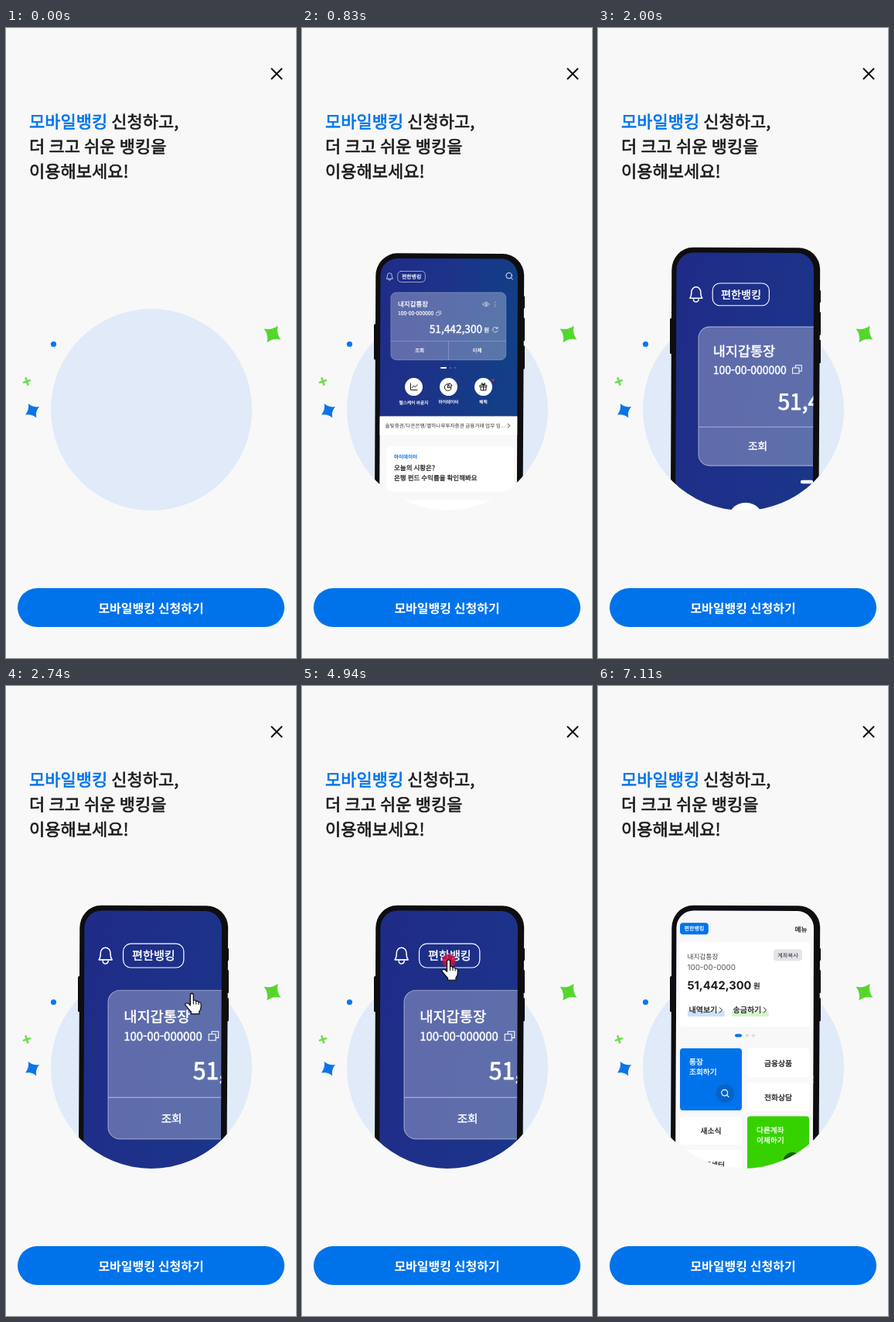
Write an HTML page that moves like this. It is 375 by 812 pixels and loops after 8200 ms.

```html
<!DOCTYPE html>
<html lang="ko">
<head>
<meta charset="utf-8">
<title>모바일뱅킹 신청</title>
<style>
html, body { margin: 0; width: 100%; height: 100%; overflow: hidden; background: #f8f8f8; }
svg { display: block; width: 375px; height: 812px; }
text {
  font-family: "Noto Sans CJK KR", "Noto Sans CJK", sans-serif;
  text-rendering: geometricPrecision;
  word-spacing: -.045em;
  white-space: pre;
  fill: currentColor;
}
tspan { fill: currentColor; }
/* medium weight: regular outlines, slightly thickened */
.medium, .medium tspan { font-weight: 400; stroke: currentColor; stroke-width: .03em; stroke-linejoin: round; }
text.num { font-family: Inter, "Noto Sans", sans-serif; }
.line { fill: none; stroke: #fff; stroke-linecap: round; stroke-linejoin: round; }
.ink { stroke: #1a1a1a; }
</style>
</head>
<body>
<svg viewBox="0 0 375 812" xmlns="http://www.w3.org/2000/svg">
  <defs>
    <linearGradient id="navy" x1="0" x2="1" y1="0" y2=".25">
      <stop offset="0" stop-color="#202b87"/>
      <stop offset=".5" stop-color="#1c3389"/>
      <stop offset="1" stop-color="#123f86"/>
    </linearGradient>
    <mask id="stand" maskUnits="userSpaceOnUse" x="0" y="0" width="375" height="812">
      <path d="M0 0H375V492H318A130 130 0 0 1 58 492H0Z" fill="#fff"/>
    </mask>
    <clipPath id="glass"><path d="M100 640L101.5 312A22 22 0 0 1 124 289.5L258 290A21 22 0 0 1 279 312L277.7 640Z"/></clipPath>
    <clipPath id="hole"><circle id="reveal" cx="192.5" cy="364" r="0"/></clipPath>
    <path id="star" d="M0-13Q3.4-3.4 13 0Q3.4 3.4 0 13Q-3.4 3.4-13 0Q-3.4-3.4 0-13Z"/>
  </defs>

  <rect width="375" height="812" fill="#f8f8f8"/>
  <path d="M343.5 52.5L356.5 65.5M356.5 52.5L343.5 65.5" stroke="#111" stroke-width="2" stroke-linecap="round"/>
  <circle cx="188" cy="492" r="130" fill="#e0eaf9"/>
  <use href="#star" transform="translate(344.5 394.7) rotate(33)" fill="#55d62f"/>
  <use href="#star" transform="translate(34 493.3) rotate(-30) scale(.8)" fill="#0b74e8"/>
  <path d="M-5.3 0H5.3M0-5.3V5.3" transform="translate(27 455.5) rotate(-18)" stroke="#6bdb4a" stroke-width="2.6"/>
  <circle cx="61.5" cy="407.5" r="3.6" fill="#0b78ee"/>
  <g id="head"></g>
  <rect x="15" y="722" width="345" height="50" rx="25" fill="#0073eb"/>
  <g id="cta"></g>

  <g mask="url(#stand)">
    <g id="phone">
      <g fill="#0e0e10">
        <rect x="93" y="374" width="4" height="46" rx="1.5"/>
        <rect x="284" y="338" width="4" height="16" rx="1"/>
        <rect x="284" y="366" width="4" height="30" rx="1"/>
        <rect x="284" y="402" width="4" height="30" rx="1"/>
        <path d="M93.800 640L95.300 312A28 29 0 0 1 123 282.700L259 283.300A28 28 0 0 1 287.200 311L285.300 640Z"/>
      </g>
      <g clip-path="url(#glass)">
        <g id="home">
          <rect x="95" y="284" width="190" height="209.500" fill="url(#navy)"/>
          <rect x="95" y="493" width="190" height="320" fill="#f8f8f8"/>
          <rect x="95" y="493" width="190" height="24" fill="#fff"/>
          <g class="line" stroke-width=".7">
            <path d="M109.400 315.300Q110.400 314 110.400 311.400A2.900 3.200 0 0 1 116.200 311.400Q116.200 314 117.200 315.300ZM111.700 316A1.600 1.600 0 0 0 114.900 316"/>
            <rect x="123.700" y="305.900" width="35.600" height="14" rx="4.500" stroke-width=".55"/>
            <circle cx="267.600" cy="311.600" r="3.700" stroke-width=".9"/>
            <path d="M270.300 314.300L272.500 316.500" stroke-width=".9"/>
          </g>
          <rect x="114.800" y="333.200" width="149" height="87.100" rx="7" fill="#fff" fill-opacity=".29" stroke="#fff" stroke-opacity=".45" stroke-width=".5"/>
          <path d="M115 396H263.600M189.500 396V420.200" stroke="#fff" stroke-opacity=".45" stroke-width=".5"/>
          <g class="line" stroke-width=".6">
            <path d="M175.800 358.800V357.300H179.700V361H178.200M174 358.900H178.100V362.500H174Z" stroke-width=".5"/>
            <path d="M233.800 348.500Q238 343 242.200 348.500Q238 354 233.800 348.500Z"/>
            <circle cx="238" cy="348.500" r="1.300"/>
            <path d="M249.500 345.700V345.800M249.500 348.500V348.600M249.500 351.300V351.400" stroke-width=".9"/>
            <path d="M252.600 379.200A3.300 3.300 0 1 0 253 382.500M253 377.800V379.800H251" stroke-width=".7"/>
          </g>
          <rect x="179" y="429.300" width="8" height="2.200" rx="1.100" fill="#fff"/>
          <circle cx="192" cy="430.400" r=".8" fill="#fff" opacity=".5"/>
          <circle cx="197.800" cy="430.400" r=".8" fill="#fff" opacity=".5"/>
          <g fill="#fff">
            <circle cx="144.500" cy="455" r="11.500"/>
            <circle cx="189.500" cy="455" r="11.500"/>
            <circle cx="234.500" cy="455" r="11.500"/>
          </g>
          <g class="line ink" stroke-width="1">
            <path d="M140.500 450.500V459H149M142.300 456L144.600 453.500L146.300 455L149 452.200"/>
            <path d="M188.500 451.200A4.300 4.300 0 1 0 193 456H188.500ZM190.300 450.300A4.300 4.300 0 0 1 194 454.300H190.300Z"/>
            <path d="M230.300 452.800H238.700V455H230.300ZM231 455V459.300H238V455M234.500 452.800V459.300M234.500 452.600Q231 451.500 232.300 450.200Q233.800 449.700 234.500 452.600Q235.200 449.700 236.700 450.200Q238 451.500 234.500 452.600"/>
          </g>
          <circle cx="247" cy="446" r="1.700" fill="#e3223f"/>
          <path class="line ink" stroke-width=".9" d="M266.300 502.500L268.800 505L266.300 507.500"/>
          <rect x="109" y="532" width="165" height="58" rx="6" fill="#fff"/>
          <rect x="101" y="601" width="178" height="80" rx="6" fill="#fff"/>
          <g id="homeText"></g>
        </g>
        <g clip-path="url(#hole)">
          <rect x="95" y="284" width="190" height="360" fill="#f8f8f8"/>
          <rect x="106" y="305.300" width="36.800" height="14.900" rx="4" fill="#0073eb"/>
          <g id="tiles"></g>
          <rect x="227" y="339.300" width="37" height="15" rx="4" fill="#e3e4e7"/>
          <g fill="#dcdcdc">
            <rect x="177" y="448.500" width="9" height="4" rx="2" fill="#0073eb"/>
            <circle cx="192.800" cy="450.500" r="1.900"/>
            <circle cx="201" cy="450.500" r="1.900"/>
          </g>
          <rect x="116" y="419" width="47.500" height="7" fill="#cfe1fa"/>
          <rect x="173" y="419" width="47.500" height="7" fill="#d5f4cb"/>
          <path class="line ink" stroke-width="1" d="M157.200 414.500L160.500 417.800L157.200 421.100M214.200 414.500L217.500 417.800L214.200 421.100"/>
          <circle cx="164.500" cy="525" r="12" fill="#0763c8"/>
          <g class="line" stroke-width="1.200">
            <circle cx="163.700" cy="524.300" r="3.900"/>
            <path d="M166.600 527.200L169 529.600"/>
          </g>
          <circle cx="251.500" cy="613" r="12" fill="#155c08"/>
          <g id="easyText"></g>
        </g>
        <circle id="pulse" cx="190" cy="354" r="0" fill="#d3103b"/>
        <g id="hand" stroke="#111" stroke-width="1.300" stroke-linejoin="round" stroke-linecap="round">
          <path fill="#fff" d="M7.500 16V3Q7.500 .8 9.500 .8Q11.500 .8 11.500 3V9.800Q14.300 8.700 15 11Q17.500 10 18.200 12.200Q21.300 11.700 21.300 14.500V18Q21.300 21.500 19 24V27.200H8.500V24.500Q5.500 21.500 1.200 16Q.2 13.500 2.700 13.200Q5 13 7.500 16Z"/>
          <path fill="none" stroke-width="1" d="M11.500 10V14.500M15 11V14.800M18.200 12.200V15.200"/>
        </g>
      </g>
    </g>
  </g>
</svg>
<script>
const LOOP = 8200;
const BLUE = "#0073eb", INK = "#1c1c1c", WHITE = "#fff";
const $ = id => document.getElementById(id);

// Rows: x, middle y, size, text, colour, weight, anchor, class
function write(id, rows) {
  $(id).innerHTML = rows.map(([x, y, size, str, color, weight = 500, anchor = "start", cls = ""]) =>
    `<text x="${x}" y="${y + size * .37}" font-size="${size}" color="${color}" font-weight="${weight}" text-anchor="${anchor}" class="${weight === 500 ? "medium" : cls}">${str}</text>`
  ).join("");
}

write("head", [
  [30, 120.9, 22, `<tspan color="${BLUE}">모바일뱅킹</tspan> 신청하고,`, INK],
  [30, 152.9, 22, "더 크고 쉬운 뱅킹을", INK],
  [30, 184.9, 22, "이용해보세요!", INK]
]);
write("cta", [[187.5, 748.1, 16, "모바일뱅킹 신청하기", WHITE, 700, "middle"]]);
write("homeText", [
  [141.6, 312.9, 6.9, "편한뱅킹", WHITE, 500, "middle"],
  [124, 348.7, 8.5, "내지갑통장", WHITE],
  [124, 360.1, 6.8, "100-00-000000", WHITE],
  [164.7, 380.3, 13.7, "51,442,300", WHITE],
  [235.3, 381.5, 7.5, "원", WHITE],
  [152.1, 408.3, 6.6, "조회", WHITE, 500, "middle"],
  [226.5, 408.3, 6.6, "이체", WHITE, 500, "middle"],
  [144.5, 475, 5.7, "헬스케어 라운지", WHITE, 500, "middle"],
  [189.5, 474.5, 5.7, "마이데이터", WHITE, 500, "middle"],
  [234.5, 474.5, 5.7, "혜택", WHITE, 500, "middle"],
  [107.5, 505, 6.6, "솔빛증권/다온은행/별하나루투자증권 금융거래 업무 임...", "#333", 400],
  [119, 545.5, 6.5, "마이데이터", BLUE, 700],
  [119, 559, 8.5, "오늘의 시황은?", INK],
  [119, 572, 8.5, "은행 펀드 수익률을 확인해봐요", INK]
]);
write("easyText", [
  [124.5, 312.8, 7, "편한뱅킹", WHITE, 500, "middle"],
  [254.5, 313.5, 8.7, "메뉴", INK],
  [115.5, 348.7, 8.7, "내지갑통장", "#444", 400],
  [245.5, 347, 7.3, "계좌복사", "#333", 400, "middle"],
  [115.5, 361.9, 9.8, "100-00-0000", "#555", 400, "start", "num"],
  [115.5, 385.1, 14.6, "51,442,300", INK, 700, "start", "num"],
  [201, 386, 9.5, "원", INK],
  [117.5, 417.5, 10, "내역보기", INK],
  [174.5, 417.5, 10, "송금하기", INK],
  [118, 484, 9.7, "통장", WHITE],
  [118, 497, 9.7, "조회하기", WHITE],
  [233, 486.5, 9.8, "금융상품", INK, 500, "middle"],
  [233, 530, 9.8, "전화상담", INK, 500, "middle"],
  [146, 573.5, 9.8, "새소식", INK, 500, "middle"],
  [146, 617, 9.8, "고객센터", INK, 500, "middle"],
  [205, 572, 9.7, "다른계좌", WHITE],
  [205, 585.3, 9.7, "이체하기", WHITE]
]);

$("tiles").innerHTML = [
  [105.5, 330, 168.5, 109, WHITE],
  [106, 467, 80, 80, BLUE],
  [193, 467, 80, 37, WHITE],
  [193, 511, 80, 37, WHITE],
  [106, 554.5, 80, 37, WHITE],
  [106, 598, 80, 37, WHITE],
  [193, 554.5, 80, 80, "#36d200"]
].map(([x, y, w, h, c]) => `<rect x="${x}" y="${y}" width="${w}" height="${h}" rx="4" fill="${c}"/>`).join("");

const span = (t, a, b) => Math.min(1, Math.max(0, (t - a) / (b - a)));
const easeOut = u => 1 - (1 - u) ** 2;

// CSS "ease" curve, cubic-bezier(.25, .1, .25, 1)
function ease(u) {
  let lo = 0, hi = 1, s = u;
  for (let i = 0; i < 24; i++) {
    s = (lo + hi) / 2;
    const x = .75 * s * (1 - s) + s ** 3;
    if (x < u) lo = s; else hi = s;
  }
  return .3 * s * (1 - s) ** 2 + 3 * s * s * (1 - s) + s ** 3;
}

// Pointer route: time, x, y
const route = [
  [2630, 257, 368], [2740, 231, 395], [3000, 205, 540], [3250, 140, 515],
  [3440, 157, 421], [3780, 180, 357], [4060, 180, 352]
];

function slope(i, k) {
  if (i === 0 || i === route.length - 1) return 0;
  const a = route[i - 1], b = route[i + 1];
  return (b[k] - a[k]) / (b[0] - a[0]);
}

// Smooth curve through the route points
function along(t, k) {
  const last = route.length - 1;
  if (t >= route[last][0]) return route[last][k];
  let i = 0;
  while (i < last - 1 && t >= route[i + 1][0]) i++;
  const a = route[i], b = route[i + 1], d = b[0] - a[0];
  const u = span(t, a[0], b[0]), v = 1 - u;
  return a[k] * (1 + 2 * u) * v * v + b[k] * u * u * (3 - 2 * u)
    + d * u * v * (slope(i, k) * v - slope(i + 1, k) * u);
}

function draw(t) {
  const rise = 342 * (1 - ease(span(t, 160, 990)));
  $("phone").setAttribute("transform", `translate(0 ${rise})`);

  const zoom = 1 + 1.2 * easeOut(span(t, 1345, 2350));
  $("home").setAttribute("transform", `translate(100.5 284) scale(${zoom}) translate(-100.5 -284)`);

  const shown = t >= 2635 && t < 5890;
  $("hand").style.display = shown ? "" : "none";
  if (shown) $("hand").setAttribute("transform", `translate(${along(t, 1)} ${along(t, 2)})`);

  const tapping = t >= 4060 && t < 5890;
  const beat = tapping ? Math.min(1, ((t - 4060) % 640) / 560) : 1;
  $("pulse").setAttribute("r", beat < 1 ? 14 * easeOut(beat) ** 1.2 : 0);
  $("pulse").setAttribute("opacity", 1 - beat * beat);

  $("reveal").setAttribute("r", Math.min(300, Math.max(0, (t - 5877) * .3)));
}

function tick() {
  draw(performance.now() % LOOP);
  requestAnimationFrame(tick);
}
tick();
</script>
</body>
</html>
```
